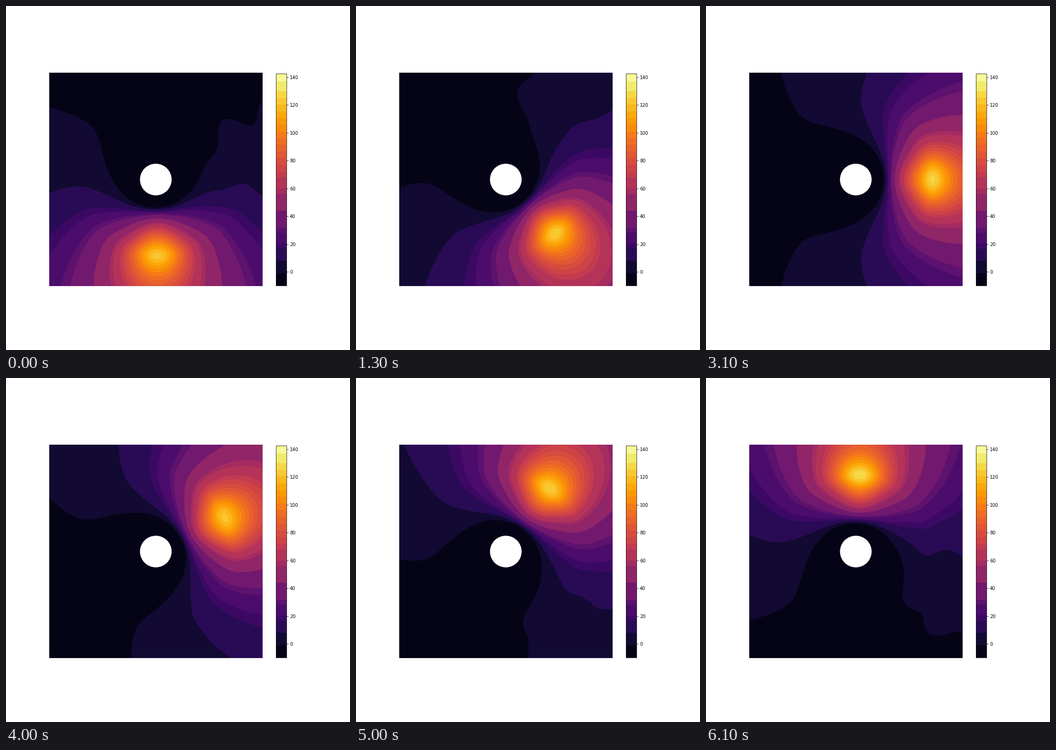
Animation, 748 px wide and 748 px high, one loop 6200 ms. Source, as a matplotlib script:

```python
import numpy as np
import matplotlib.pyplot as plt
from matplotlib.animation import FuncAnimation
from matplotlib.cm import ScalarMappable
from matplotlib.colors import BoundaryNorm, ListedColormap
from matplotlib.patches import Circle

FRAMES, INTERVAL = 62, 100
SIZE, DPI = 748, 72
SCALE = 10.4 * DPI / SIZE       # layout of a 10.4 inch page on whole pixels
HALF = 0.31 * SIZE * SCALE      # half side of the square map, in pixels
SPOT, HOLE = 166, 34.4          # orbit of the hot spot, radius of the disc
TICKS = range(0, 141, 20)

# Wide bands where it is cool, even narrow ones where it is hot.
LEVELS = np.r_[-9.8, -0.8, 8, 16.7, 20.5, 28.3, 32, 44, 56, 60, 68,
               np.linspace(72, 130, 13), 137, 142.7]

axis = np.linspace(-HALF, HALF, 241)
X, Y = np.meshgrid(axis, axis)
RADIUS, PHI = np.hypot(X, Y), np.arctan2(Y, X)


def bell(x, centre, width):
    return np.exp(-((x - centre) / width) ** 2)


def soft_abs(x, core):
    """Absolute value with a rounded tip."""
    return np.sqrt(x ** 2 + core ** 2) - core


def ripple(k, angle):
    """Waviness of the cool bands on the right half, in radians."""
    strength = np.cos(np.pi * k / FRAMES) ** 3
    side = angle if strength > 0 else -angle
    wave = 5 * np.cos((RADIUS - 98) / 15) - 5
    return strength * np.radians(wave) * bell(side, np.radians(115), 0.6)


def field(k):
    # Half a turn from bottom to top, a little ahead and closer in early on.
    lead = bell(k, 11, 9)
    turn = np.radians(180 * k / FRAMES - 90 + 5 * lead)
    angle = (PHI - turn + np.pi) % (2 * np.pi) - np.pi
    bent = np.abs(angle) - ripple(k, angle)

    # Heat decays with distance from the spot, more slowly along the radius.
    across = 2 * SPOT * np.sin(bent / 2)
    along = 64 * soft_abs(RADIUS - SPOT + 9 * lead, 15)
    distance = np.sqrt(across ** 2 + along)
    heat = 137 * np.exp(-soft_abs(distance, 30) / 94)

    # The disc casts a cold zone that widens away from the spot.
    edge = 59 + 15 * (1 - np.cos(bent))
    shade = 1 - np.exp(-np.maximum(RADIUS - edge, 0) / 29)

    pulse = 4 * np.cos(2 * np.pi * (k - 23) / 38) * bell(distance, 0, 30)
    return heat * shade - 8 + pulse


fig, ax = plt.subplots(figsize=(SIZE / DPI, SIZE / DPI), dpi=DPI)
fig.subplots_adjust(left=0.125 * SCALE, right=0.9 * SCALE,
                    bottom=0.11 * SCALE, top=0.88 * SCALE)
ax.set_aspect("equal")
ax.set_xlim(-HALF, HALF)
ax.set_ylim(-HALF, HALF)
ax.axis("off")

middles = (LEVELS[:-1] + LEVELS[1:]) / 2
tones = np.clip((middles - LEVELS[0]) / np.ptp(LEVELS), 0.04, 1)
cmap = ListedColormap(plt.get_cmap("inferno")(tones))
norm = BoundaryNorm(LEVELS, len(middles))

bar = fig.colorbar(ScalarMappable(norm, cmap), ax=ax, shrink=0.8,
                   spacing="proportional", ticks=TICKS)
bar.minorticks_off()
bar.ax.set_yticks(TICKS, [str(t) for t in TICKS])

ax.add_patch(Circle((0, 0), HOLE, color="white", lw=0, zorder=5))
shown = []


def update(k):
    while shown:
        shown.pop().remove()
    shown.append(ax.contourf(X, Y, field(k), levels=LEVELS, cmap=cmap,
                             norm=norm))
    return shown


anim = FuncAnimation(fig, update, frames=FRAMES, interval=INTERVAL,
                     init_func=lambda: [], repeat=True, blit=False)
plt.show()
```
